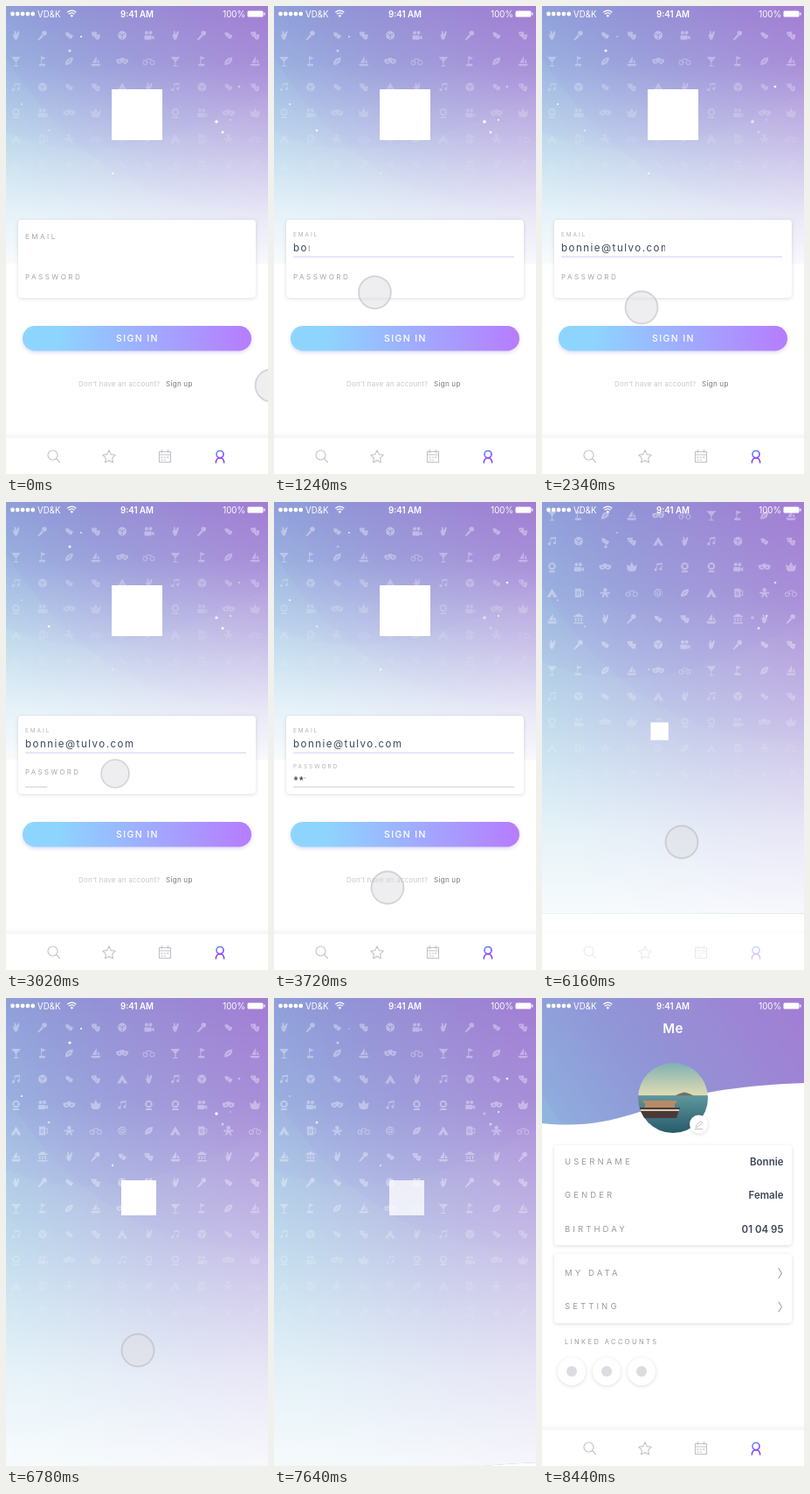
An HTML page that plays this animation: 300x534 px, repeating every 8540 ms.

```html
<!DOCTYPE html>
<html lang="en">
<head>
<meta charset="utf-8">
<title>Sign in</title>
<style>
html, body { margin: 0; width: 100%; height: 100%; overflow: hidden; background: #fff; }
svg { display: block; width: 300px; height: 534px; font-family: Inter, "Open Sans", sans-serif; }
.card { fill: #fff; filter: drop-shadow(0 1px 2px #0002); }
.field { font-size: 8px; letter-spacing: 2.5px; fill: #a4a4aa; }
.row { font-size: 9.5px; letter-spacing: 3.1px; fill: #9a9a9f; }
.value { font-size: 11.5px; font-weight: 600; fill: #3d4658; text-anchor: end; }
.typed { fill: #3d4658; }
.line { fill: none; stroke: #c2c2c8; stroke-linecap: round; stroke-linejoin: round; }
.mid { text-anchor: middle; }
</style>
</head>
<body>
<svg viewBox="0 0 300 534">
  <defs>
    <linearGradient id="sky" x1="1" y1="0" x2="0" y2=".7">
      <stop stop-color="#ab80d3"/><stop offset=".55" stop-color="#959fd7"/><stop offset="1" stop-color="#92c6e0"/>
    </linearGradient>
    <linearGradient id="fade" x1="0" y1="0" x2="0" y2="1">
      <stop stop-color="#fff" stop-opacity="0"/><stop offset=".22" stop-color="#fff" stop-opacity=".1"/>
      <stop offset=".5" stop-color="#fff" stop-opacity=".4"/><stop offset=".8" stop-color="#fff" stop-opacity=".77"/>
      <stop offset="1" stop-color="#fff" stop-opacity=".93"/>
    </linearGradient>
    <linearGradient id="button">
      <stop offset=".15" stop-color="#8dd5ff"/><stop offset="1" stop-color="#b67cff"/>
    </linearGradient>
    <linearGradient id="active" gradientUnits="userSpaceOnUse" x1="240" y1="506" x2="250" y2="522">
      <stop stop-color="#4aa8ff"/><stop offset=".6" stop-color="#8a3ff0"/>
    </linearGradient>
    <linearGradient id="air" x1="0" y1="0" x2="0" y2="1">
      <stop stop-color="#7fb0b3"/><stop offset=".46" stop-color="#dfdcb4"/>
      <stop offset=".47" stop-color="#5f979d"/><stop offset="1" stop-color="#265b6b"/>
    </linearGradient>
    <linearGradient id="shade" x1="0" y1="0" x2="0" y2="1">
      <stop stop-color="#000" stop-opacity="0"/><stop offset="1" stop-color="#000" stop-opacity=".05"/>
    </linearGradient>
    <clipPath id="wave"><path id="waveShape" d="M0-700H300V97C245 99 205 104 170 112C110 127 75 151 0 143Z"/></clipPath>
    <clipPath id="below"><rect y="10" width="300" height="524"/></clipPath>
    <clipPath id="mailClip"><rect id="mailBox" x="22" y="265" height="20"/></clipPath>
    <clipPath id="passClip"><rect id="passBox" x="22" y="308" height="16"/></clipPath>
    <clipPath id="photo"><circle cx="150" cy="114" r="40"/></clipPath>
  </defs>

  <g clip-path="url(#wave)">
    <rect id="base" width="300" fill="url(#sky)"/>
    <g id="blobs" fill="#6f6bd0" fill-opacity=".08">
      <path d="M0 195Q120 250 300 150V-100H0Z"/><path d="M0 110Q110 290 300 287V-100H0Z"/>
    </g>
    <rect id="mist" width="300" fill="url(#fade)"/>
    <g clip-path="url(#below)"><g id="pattern" fill="#fff" fill-rule="evenodd"></g></g>
    <g id="stars" fill="#fff"></g>
  </g>

  <rect id="mark" fill="#fff"/>

  <g id="form">
    <rect x="121" y="95" width="58" height="58" fill="#fff"/>
    <rect class="card" x="14" y="244" width="272" height="89" rx="4"/>
    <text id="mailLabel" class="field">EMAIL</text>
    <text id="passLabel" class="field">PASSWORD</text>
    <rect id="mailLine" x="22" y="285.7" height=".8" fill="#c3bff2"/>
    <rect id="passLine" x="22" y="324.7" height=".8" fill="#bcbcd6"/>
    <text class="typed" x="22" y="279.5" font-size="11.5" letter-spacing="1.5" clip-path="url(#mailClip)">bonnie@tulvo.com</text>
    <text class="typed" x="22" y="321" font-size="10" letter-spacing=".2" style="font-family:'Noto Sans Mono',monospace;font-weight:700" clip-path="url(#passClip)">*****************</text>
    <rect x="19" y="365" width="262" height="28.5" rx="14.2" fill="url(#button)" style="filter:drop-shadow(0 2px 2px #a9a0e066)"/>
    <text class="mid" x="150.5" y="382.5" font-size="10.5" letter-spacing="1.4" font-weight="500" fill="#fff">SIGN IN</text>
    <text x="83" y="433.7" font-size="8" letter-spacing=".2" fill="#c8c8cd">Don't have an account?</text>
    <text x="183" y="433.7" font-size="8" letter-spacing=".25" font-weight="500" fill="#8a8a94">Sign up</text>
  </g>

  <g id="profile">
    <text id="title" class="mid" x="150" y="40" font-size="15" font-weight="600" letter-spacing=".4" fill="#fff">Me</text>
    <g id="avatar">
      <g clip-path="url(#photo)">
        <rect x="110" y="74" width="80" height="80" fill="url(#air)"/>
        <path d="M152 111.500q6-3 11-4q5 1 11 4z" fill="#6d7068"/>
        <path d="M111 125h47l-4 12h-39z" fill="#4c3a38"/>
        <path d="M116 117h38v3h-38zM118 120h34v5h-34z" fill="#b98a66"/>
        <path d="M112 127h45v2h-45z" fill="#d8cdb4"/>
      </g>
      <circle class="card" cx="179.5" cy="144" r="10.5"/>
      <path class="line" d="M176 147.5l1-3 5-4 1.7 2-5 4zM175 149.5h9"/>
    </g>
    <g id="facts">
      <rect class="card" x="14" y="168" width="272" height="114" rx="4"/>
      <text class="row" x="26" y="190">USERNAME</text><text class="value" x="276.5" y="191">Bonnie</text>
      <text class="row" x="26" y="228.2">GENDER</text><text class="value" x="276.5" y="229.2">Female</text>
      <text class="row" x="26" y="266.5">BIRTHDAY</text><text class="value" x="276.5" y="267.5">01 04 95</text>
    </g>
    <g id="links">
      <rect class="card" x="14" y="292" width="272" height="79" rx="4"/>
      <text class="row" x="26" y="317">MY DATA</text><text class="row" x="26" y="355.2">SETTING</text>
      <path class="line" style="stroke:#8c8c92" d="M271 308.5l3.5 5.5-3.5 5.5M271 347l3.5 5.5-3.5 5.5"/>
    </g>
    <g id="accounts">
      <text x="26" y="394.7" font-size="7.5" letter-spacing="2.4" fill="#9a9a9f">LINKED ACCOUNTS</text>
    </g>
  </g>

  <g id="tabs">
    <rect y="486" width="300" height="8" fill="url(#shade)"/>
    <rect y="493" width="300" height="41" fill="#fff"/>
    <g class="line" stroke-width="1.1">
      <circle cx="53.5" cy="512.5" r="5.5"/><path d="M57.5 516.5l4 4"/>
      <path d="M118 507l2.2 4.6 5 .7-3.6 3.5.9 5-4.5-2.4-4.5 2.4.9-5-3.6-3.5 5-.7z"/>
      <path d="M175.5 508.5h13v12h-13zM175.5 512h13M178.5 506.5v3M185.5 506.5v3M178 515h1.5M181.3 515h1.5M184.5 515h1.5M178 518h1.5M181.3 518h1.5"/>
    </g>
    <g fill="none" stroke="url(#active)" stroke-width="1.6" stroke-linecap="round">
      <circle cx="245" cy="511.5" r="4"/><path d="M240.3 521c.3-7 9.1-7 9.4 0"/>
    </g>
  </g>

  <g id="status" fill="#fff" font-size="9.7">
    <text x="36" y="12.6">VD&amp;K</text>
    <text class="mid" x="150" y="12.6" font-weight="600">9:41 AM</text>
    <text x="274" y="12.6" text-anchor="end">100%</text>
    <rect x="276.5" y="5.5" width="18" height="7" rx="1.5"/><rect x="295.3" y="7.5" width="1.2" height="3"/>
    <path d="M70.3 7.3q5-4.3 10 0M72 9.2q3.3-2.8 6.6 0" fill="none" stroke="#fff" stroke-width="1.3"/>
    <circle cx="75.3" cy="11.3" r="1.3"/>
  </g>

  <g id="touch"><circle r="18.5" fill="#dedee2" fill-opacity=".5" stroke="#b0b0ba" stroke-opacity=".5" stroke-width="1.8"/></g>
</svg>
<script>
const LOOP = 8540;
const $ = id => document.getElementById(id);
const set = (id, attrs) => { for (const k in attrs) $(id).setAttribute(k, attrs[k]); };
const add = (parent, tag, attrs) => {
  const el = document.createElementNS('http://www.w3.org/2000/svg', tag);
  for (const k in attrs) el.setAttribute(k, attrs[k]);
  return $(parent).appendChild(el);
};
const seg = (t, start, length) => Math.min(1, Math.max(0, (t - start) / length));
const out = p => 1 - (1 - p) ** 3;
const smooth = p => p * p * (3 - 2 * p);
const mix = (a, b, p) => a + (b - a) * p;
const ring = (x, y, r) => `M${x - r} ${y}a${r} ${r} 0 1 0 ${2 * r} 0a${r} ${r} 0 1 0 ${-2 * r} 0`;

// Pattern icons, each centred on its own origin
const icons = {
  h: 'M-4-2L-2 0L-2-5H-.5L.3-1L2.5-5L4-4L2 3L0 5.5L-2 4Z',
  m: ring(2, -2.5, 2.8) + 'M-1-1L1 1L-4.5 6L-5.5 5Z',
  k: 'M-4.5-3Q-1-4.5 1-2Q0 2-2 2Q-4 0-4.5-3M1-1.5Q3-1 4.5 0Q4 4 1 4Q0 3-1 2Q1 1 1-1.5',
  a: 'M-5-4H1V-1H5Q5 5 2 5Q-1 4-1 2Q-5 1-5-4M-3-2V-1H-2V-2ZM1 1V2H2V1Z',
  b: ring(0, 0, 5) + ring(0, 0, 1.2) + ring(-2.4, -1.5, .8) + ring(2.4, -1.5, .8) + ring(0, 3, .8),
  c: ring(-2.5, -3, 2) + ring(2, -3, 2) + 'M-5 0H3V5H-5ZM3 2L6 0V5L3 3Z',
  g: 'M-5.5-5H5.5L.6.5V5H3V6H-3V5H-.6V.5Z',
  f: 'M-2-6L4-3.5L-1-1.5V3H3V5.5H-4V3H-2Z',
  o: 'M-4.5 4.5Q-5-4 4.5-4.5Q5 4-4.5 4.5M-2 1.5L-1.5 2L2-1.5L1.5-2Z',
  s: 'M1-6V2H-4ZM2-3L5 2H2ZM-6 3H6L4 5.5H-4Z',
  v: 'M-7-2Q0-4 7-2Q7 3 3 3Q1 3 0 1Q-1 3-3 3Q-7 3-7-2M-4-.5V1H-2V-.5ZM2-.5V1H4V-.5ZM-2-4H2V-3H-2Z',
  y: ring(-4, 1.5, 3) + ring(-4, 1.5, 2.1) + ring(4, 1.5, 3) + ring(4, 1.5, 2.1) + 'M-4 1L-2-3H3L4 1.5L2.5-2H-1.5L-3 2Z',
  n: ring(-3, 3, 1.7) + ring(3, 2, 1.7) + 'M-2-4L4.5-5V2H3.7V-3L-1.3-2V3H-2Z',
  t: 'M0-5L6 5H2L0 1L-2 5H-6Z',
  e: ring(0, -1, 4.3) + 'M-2-3H2V1H-2ZM-3 4L-4 6H4L3 4Z',
  w: 'M0-6L2.5-1L6-3L5 3L3 5H-3L-5 3L-6-3L-2.5-1Z',
  u: 'M-4-5H3V5H-4ZM3-3H6V3H3V2H5V-2H3ZM-2-2V3H-1V-2ZM0-2V3H1V-2Z',
  p: ring(0, -3.5, 2.3) + 'M-5.5-1H5.5V1H2L4 5H2L0 2L-2 5H-4L-2 1H-5.5Z',
  q: ring(0, 0, 4.8) + ring(.3, .2, 3.8) + ring(.3, .2, 2.6) + ring(0, 0, 1.5),
  x: 'M0-6L5.5-3V-2H-5.5V-3ZM-4-1H-2.5V3H-4ZM-.7-1H.7V3H-.7ZM2.5-1H4V3H2.5ZM-5.5 4H5.5V5.5H-5.5Z'
};
const rows = ['hmkabc', 'gfosvy', 'nbkath', 'ecvwne', 'tupyqo', 'sxhmka'];
for (let r = 0; r < 12; r++)
  for (let c = 0; c < 10; c++)
    add('pattern', 'path', {
      d: icons[rows[r % 6][c % 6]],
      transform: `translate(${11.5 + c * 30.4} ${33.5 + r * 29.5})`,
      opacity: .37 * Math.min(1, (12.5 - r) / 6.5)
    });

const stars = [[73, 51, 1.6], [86, 35, 1], [18, 112, 1], [49, 142, 1.3], [122, 191, 1.2],
  [241, 132, 1.8], [257, 130, 1], [267, 92, 1.3], [248, 144, 1.5]]
  .map(([cx, cy, r]) => add('stars', 'circle', { cx, cy, r }));

for (let i = 0; i < 5; i++) add('status', 'circle', { cx: 7.5 + i * 5.8, cy: 9, r: 2.4 });

for (const cx of [34, 74, 114]) {
  add('accounts', 'circle', { class: 'card', cx, cy: 426, r: 16 });
  add('accounts', 'circle', { cx, cy: 426, r: 6, fill: '#dcdce0' });
}

// Touch path: time, x, y
const path = [[0, 304, 433], [700, 120, 272], [900, 120, 272], [1400, 114, 344], [2500, 114, 344],
  [2880, 125, 310], [3080, 125, 310], [3500, 130, 440], [5380, 130, 440], [5500, 131, 430],
  [5800, 148, 380], [5980, 150, 380], [6160, 160, 388], [6780, 151, 402], [LOOP, 151, 402]];
const taps = [800, 2980, 5910];

function touch(t) {
  const i = path.findIndex(k => k[0] > t);
  const [a, b] = [path[i - 1], path[i]];
  const p = smooth(seg(t, a[0], b[0] - a[0]));
  const press = Math.max(...taps.map(tap => 1 - seg(Math.abs(t - tap), 0, 110)));
  set('touch', {
    transform: `translate(${mix(a[1], b[1], p)} ${mix(a[2], b[2], p)}) scale(${1 - .2 * smooth(press)})`,
    opacity: 1 - seg(t, 6880, 220)
  });
}

function field(name, t, focus, y0, y1, typeStart, typeTime, width) {
  const p = out(seg(t, focus, 220));
  set(name + 'Label', { transform: `translate(22 ${mix(y0, y1, p)}) scale(${mix(1, .8, p)})`, opacity: mix(1, .85, p) });
  set(name + 'Line', { width: 253 * out(seg(t, focus, 320)) });
  set(name + 'Box', { width: width * seg(t, typeStart, typeTime) });
}

function background(t) {
  const up = 1 - out(seg(t, 6030, 370));
  const leave = smooth(seg(t, 7600, 560));
  const height = 534 - 240 * up - 234 * leave * leave;
  set('base', { height });
  set('mist', { height, opacity: 1 - leave });
  set('waveShape', { transform: `translate(0 ${440 * (1 - leave)})` });
  set('blobs', { transform: `translate(0 ${-52 * up})` });
  set('pattern', { transform: `translate(0 ${-177 * up})`, opacity: 1 - seg(leave, 0, .5) });
  set('stars', { opacity: 1 - seg(leave, 0, .5) });
  stars.forEach((s, i) => s.setAttribute('opacity', .65 + .35 * Math.sin(t / LOOP * 2 * Math.PI * (4 + i % 3) + i * 1.7)));
}

function mark(t) {
  const p = out(seg(t, 6130, 350));
  const pulse = 1 + .25 * Math.sin(Math.PI * seg(t, 6780, 680)) ** 2;
  const size = mix(14, 40, p) * pulse;
  set('mark', {
    x: mix(129, 152, p) - size / 2, y: mix(272.4, 228, p) - size / 2, width: size, height: size,
    opacity: t < 6130 ? 0 : 1 - seg(t, 7600, 180)
  });
}

function rise(id, t, start) {
  const p = out(seg(t, start, 440));
  set(id, { transform: `translate(0 ${50 * (1 - p)})`, opacity: p });
}

function draw(t) {
  background(t);
  mark(t);
  set('form', { opacity: 1 - seg(t, 6030, 110) });
  field('mail', t, 840, 266, 263.3, 1040, 1377, 126);
  field('pass', t, 3010, 312, 303.5, 3480, 1830, 107);
  set('tabs', { opacity: t < 7000 ? 1 - seg(t, 6030, 190) : smooth(seg(t, 7640, 400)) });
  set('title', { opacity: seg(t, 7800, 300) });
  const pop = out(seg(t, 7800, 420));
  set('avatar', { transform: `translate(150 114) scale(${pop}) translate(-150 -114)` });
  rise('facts', t, 7800);
  rise('links', t, 7900);
  rise('accounts', t, 8000);
  touch(t);
}

const origin = performance.now();
function frame() {
  draw((performance.now() - origin) % LOOP);
  requestAnimationFrame(frame);
}
frame();
</script>
</body>
</html>
```
